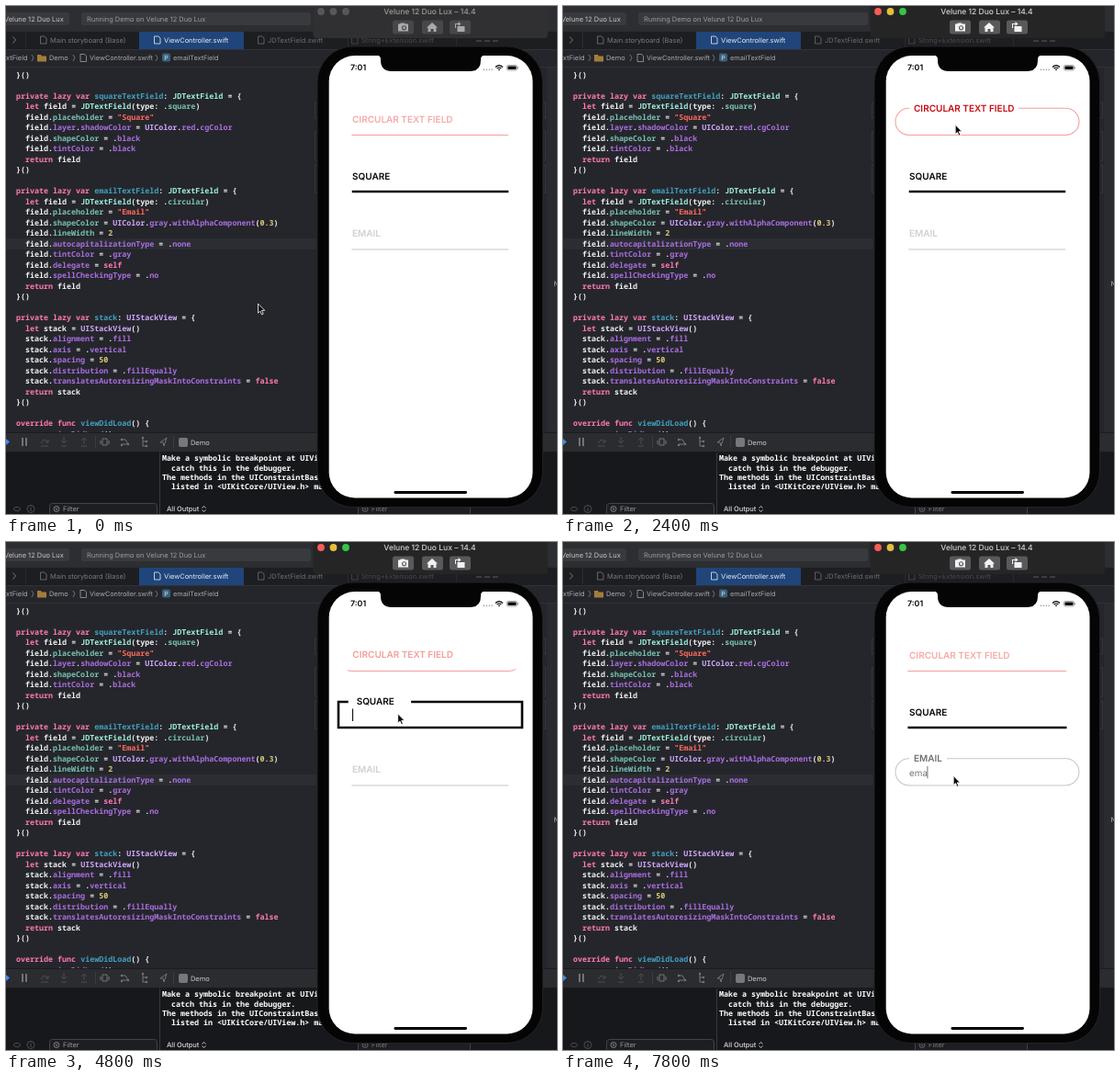
Recreate the animation shown at these times as an HTML page. Size 600x553 px, loop 8 s.

```html
<!DOCTYPE html>
<html lang="en">
<head>
<meta charset="utf-8">
<title>Text field demo</title>
<style>
html, body { margin: 0; width: 100%; height: 100%; overflow: hidden; background: #000; }
svg { display: block; width: 100vw; height: 100vh; }
text { white-space: pre; text-rendering: geometricPrecision; }
.ui { font-family: Inter, "Open Sans", sans-serif; font-size: 7.45px; }
.code { font: 600 8.36px "Noto Sans Mono", "DejaVu Sans Mono", monospace; fill: #f0f0f1; }
.label { font: 600 10px Inter, "Open Sans", sans-serif; }
.input { font: 400 9.9px Inter, "Open Sans", sans-serif; }
</style>
</head>
<body>
<svg id="stage" viewBox="0 0 600 553" preserveAspectRatio="none"></svg>
<script>
const stage = document.getElementById('stage');
const LOOP = 8000, STEP = 200;
const DEVICE = 'Velune 12 Duo Lux';

function add(tag, attrs = {}, parent = stage, content) {
  const el = document.createElementNS('http://www.w3.org/2000/svg', tag);
  for (const k in attrs) el.setAttribute(k, attrs[k]);
  if (content !== undefined) el.textContent = content;
  parent.append(el);
  return el;
}
const rect = (x, y, width, height, fill, more, parent) =>
  add('rect', { x, y, width, height, fill, ...more }, parent);
const line = (d, stroke, width = 1, parent) =>
  add('path', { d, stroke, fill: 'none', 'stroke-width': width }, parent);
const ui = (x, y, str, fill, more, parent) =>
  add('text', { x, y, fill, class: 'ui', ...more }, parent, str);
const docIcon = (x, y, stroke) => line(`M${x} ${y}h4.500l2 2v6h-6.500z`, stroke, .8);

// Syntax colouring
const KEYWORDS = /^(private|lazy|var|let|return|self|false|override|func)$/;
const OWN = /^(square|circular|placeholder|shapeColor|lineWidth)$/;
const TOKEN = /"[^"]*"|\d[\d.]*|(?<=\.)[a-z]\w*|(?<=(?:var|func) )\w+|\w+|\W/g;

function tint(token, before) {
  if (token[0] === '"') return '#fc6a5d';
  if (/^\d/.test(token)) return '#d9c97c';
  if (KEYWORDS.test(token)) return '#ff7ab2';
  if (/(var|func) $/.test(before)) return '#41a1c0';
  if (before.endsWith('.')) return OWN.test(token) ? '#78c2b3' : '#a96ee0';
  if (/^JD/.test(token)) return '#9ef1dd';
  if (/^UI/.test(token)) return '#d0a8ff';
}

function codeLine(src, x, y) {
  const text = add('text', { x, y, class: 'code' });
  let before = '';
  for (const token of src.match(TOKEN) || []) {
    const fill = tint(token, before);
    add('tspan', fill ? { fill } : {}, text, token);
    before += token;
  }
}

const SOURCE = `}()

private lazy var squareTextField: JDTextField = {
  let field = JDTextField(type: .square)
  field.placeholder = "Square"
  field.layer.shadowColor = UIColor.red.cgColor
  field.shapeColor = .black
  field.tintColor = .black
  return field
}()

private lazy var emailTextField: JDTextField = {
  let field = JDTextField(type: .circular)
  field.placeholder = "Email"
  field.shapeColor = UIColor.gray.withAlphaComponent(0.3)
  field.lineWidth = 2
  field.autocapitalizationType = .none
  field.tintColor = .gray
  field.delegate = self
  field.spellCheckingType = .no
  return field
}()

private lazy var stack: UIStackView = {
  let stack = UIStackView()
  stack.alignment = .fill
  stack.axis = .vertical
  stack.spacing = 50
  stack.distribution = .fillEqually
  stack.translatesAutoresizingMaskIntoConstraints = false
  return stack
}()

override func viewDidLoad() {
  super.viewDidLoad()`;

function drawEditor() {
  rect(0, 0, 600, 553, '#25262b');
  rect(0, 253, 338, 12, '#2b2d33');
  SOURCE.split('\n').forEach((src, i) => codeLine(src, 11, 77.6 + i * 11.5));
  for (const [y, h] of [[105, 17], [137, 31], [173, 30]])
    rect(336.5, y, 251, h, 'none', { stroke: '#36373c' });
  rect(589, 66, 11, 398, '#2a2b2f');
  ui(596.5, 305, 'N', '#b5b5b7', { 'font-size': 9 });

  // Toolbar
  rect(0, 0, 600, 27, '#2d2e31');
  rect(-5, 7, 74, 14, '#393a3d', { rx: 3 });
  rect(82, 7, 250, 14, '#393a3d', { rx: 3 });
  ui(-2, 16.8, DEVICE, '#c6c6c8');
  ui(88, 16.8, 'Running Demo on ' + DEVICE, '#9b9b9e');

  // Tabs
  rect(0, 27, 600, 20, '#1d1e21');
  rect(145, 27, 114, 20, '#1f457a');
  line('M21.5 28v18M372.5 28v18M490.5 28v18M0 27.5h600', '#2a2b2e');
  line('M7.5 33.5l3 3.5-3 3.5', '#77787b');
  for (const [x, name, fill] of [
    [48, 'Main.storyboard (Base)', '#77787c'],
    [172, 'ViewController.swift', '#e8edf5'],
    [285, 'JDTextField.swift', '#6c6d71'],
    [387, 'String+Extension.swift', '#4b4c50']
  ]) {
    docIcon(x - 10.5, 33, fill);
    ui(x, 39.8, name, fill);
  }
  line('M512 38h6m3 0h6m3 0h6', '#3c3d40', 2);

  // Breadcrumbs
  rect(0, 47, 600, 19, '#25262b');
  line('M0 47.5h600M0 66.500h600', '#303136');
  line('M28 53l2 3.5-2 3.5M73 53l2 3.5-2 3.5M163 53l2 3.5-2 3.5', '#7c7d80', .9);
  ui(0, 59.2, 'xtField', '#a9aaad');
  add('path', { d: 'M34 53h4l1 1.500h5v6h-10z', fill: '#a37c3c' });
  ui(47, 59.2, 'Demo', '#a9aaad');
  docIcon(81, 52.5, '#a0a1a4');
  ui(91, 59.2, 'ViewController.swift', '#a9aaad', { style: 'font-size:7.3px' });
  rect(170, 51.5, 9, 9, '#39627d', { rx: 2 });
  ui(172.3, 58.6, 'P', '#d6e8f2', { style: 'font-size:7px' });
  ui(182, 59.2, 'emailTextField', '#a9aaad', { style: 'font-size:7.3px' });
}

function drawConsole() {
  rect(0, 464, 600, 22, '#2b2c30');
  line('M0 464.5h600M0 485.500h600', '#1b1c1f');
  add('path', { d: 'M0 471l4 3.500-4 3.500z', fill: '#3f8cf3' });
  line('M18 470v9M22 470v9', '#88898c', 1.5);
  line('M38 476q4-7 8-1m0-3v3h-3M38 479h8M63 469v7m-3-3l3 3 3-3M60 479h6M85 477v-7m-3 3l3-3 3 3M82 479h6', '#4b4c50');
  line('M97.500 468v13M182.500 468v13', '#3b3c40');
  line('M105 471h5v7h-5zM103 473v4M112 473v4M126 472h4l3 5M126 477h7M149 470v9h4M149 474h4M168 475l7-5-3 9-1-4z', '#737478');
  for (const [x, y] of [[126, 472], [133, 477], [126, 478], [149, 470], [153, 474], [153, 479]])
    add('circle', { cx: x, cy: y, r: 1.2, fill: '#737478' });
  rect(188, 470, 10, 10, '#77787b', { rx: 2 });
  ui(201, 477.5, 'Demo', '#cbcbcd');

  rect(0, 486, 600, 67, '#17181b');
  line('M167.500 486v67', '#38393c');
  ['Make a symbolic breakpoint at UIViewAlert',
   '  catch this in the debugger.',
   'The methods in the UIConstraintBased',
   '  listed in <UIKitCore/UIView.h> may'].forEach((str, i) =>
    add('text', { x: 170, y: 495.3 + i * 10.2, class: 'code',
      style: 'fill:#fff;font-weight:700' }, stage, str));

  line('M8 547.500q4-4.500 8 0q-4 4.500-8 0M27 546v4M27 543.500v1', '#4b4c50');
  add('circle', { cx: 27, cy: 547.5, r: 4, fill: 'none', stroke: '#4b4c50' });
  for (const [x, w, fill] of [[47, 117, '#98999c'], [383, 122, '#77787b']]) {
    rect(x + .5, 541.5, w, 14, '#1d1e21', { rx: 3, stroke: '#424346' });
    add('circle', { cx: x + 8, cy: 547.5, r: 3, fill: 'none', stroke: fill, 'stroke-width': .8 });
    line(`M${x + 6.5} 547h3M${x + 7.3} 548.500h1.500`, fill, .7);
    ui(x + 15, 550.3, 'Filter', fill);
  }
  ui(175, 550.3, 'All Output', '#dededf', { 'font-weight': 500 });
  line('M213.500 546.500l2-2 2 2M213.500 548.500l2 2 2-2', '#dededf', .9);
}

function drawPhone() {
  rect(339, 44, 245.5, 501.5, '#050505', { rx: 39, stroke: '#222224', 'stroke-width': 1 });
  rect(351.7, 54, 221.8, 481.5, '#fff', { rx: 28 });
  add('path', { d: 'M404 53.500q4 .5 4 4.500v1q0 12 12 12h85q12 0 12-12v-1q0-4 4-4.500z', fill: '#050505' });
  ui(375, 70.2, '7:01', '#000', { style: 'font-size:8.8px', 'font-weight': 600 });
  for (let i = 0; i < 4; i++)
    add('circle', { cx: 520.5 + i * 2.9, cy: 69.3, r: .75, fill: '#8c8c8c' });
  line('M533 66.500q4-3.700 8 0M534.600 68q2.400-2 4.800 0', '#000', 1.2);
  add('path', { d: 'M535.700 68.900q1.300-.9 2.600 0l-1.300 1.400z', fill: '#000' });
  rect(545.5, 64.5, 11, 5.5, 'none', { rx: 1.6, stroke: '#777', 'stroke-width': .7 });
  rect(546.5, 65.5, 9, 3.5, '#000', { rx: .8 });
  rect(557.3, 66.2, .8, 2, '#777');
  rect(422.5, 528.1, 79.5, 2.8, '#000', { rx: 1.4 });
}

function drawWindowBar() {
  const bar = rect(334.5, -4, 255.5, 39, '', { rx: 4 });
  const dots = [343, 356.5, 370].map(cx => add('circle', { cx, cy: 6, r: 3.9 }));
  const title = ui(461.5, 9.2, DEVICE + ' – 14.4', '',
    { 'text-anchor': 'middle', style: 'font-size:8.5px', 'font-weight': 500 });
  const keys = [421, 453, 483].map(x => rect(x, 15.5, 23, 15, '', { rx: 2.5 }));
  const icons = add('g');
  for (const d of ['M427 19.500h2l1-1h4l1 1h3v8h-11z',
    'M458 23.500l6-5.500 6 5.500h-1.500v4.500h-3v-3h-3v3h-3v-4.500z',
    'M491.500 22h8v6h-8zM489 24v-5h3.500v-2l3 2.500-3 2.500v-2h-2.500v4z'])
    add('path', { d }, icons);
  const lens = add('circle', { cx: 433.5, cy: 23.8, r: 2, fill: 'none', 'stroke-width': 1.1 });
  return active => {
    const key = active ? '#59595b' : '#47474a';
    bar.setAttribute('fill', active ? '#252526' : '#303032');
    title.setAttribute('fill', active ? '#d2d2d3' : '#9a9a9b');
    icons.setAttribute('fill', active ? '#f2f2f2' : '#a9a9aa');
    lens.setAttribute('stroke', key);
    keys.forEach(k => k.setAttribute('fill', key));
    const colors = active ? ['#fc5b57', '#e5bf3c', '#35c648'] : Array(3).fill('#57575a');
    dots.forEach((dot, i) => dot.setAttribute('fill', colors[i]));
  };
}

const clamp = v => Math.max(0, Math.min(1, v));
const smooth = v => { v = clamp(v); return v * v * (3 - 2 * v); };
const mix = (a, b, k) => a + (b - a) * k;
const mixColor = (a, b, k) => `rgb(${a.map((v, i) => Math.round(mix(v, b[i], k)))})`;

const FADE = 300, LEFT = 362, RIGHT = 562, GAP = 377;
const REST_LEFT = 376.75, REST_RIGHT = 547.25;

// The outline runs clockwise from the gap's right end to its left end;
// at rest only the underline part of it is stroked.
function makeField(o) {
  const { y, h, r, gap } = o, bottom = y + h;
  const arc = (x, yy) => `A${r} ${r} 0 0 1 ${x} ${yy}`;
  const outline = line(`M${gap} ${y}H${RIGHT - r}${arc(RIGHT, y + r)}V${bottom - r}` +
    `${arc(RIGHT - r, bottom)}H${LEFT + r}${arc(LEFT, bottom - r)}V${y + r}` +
    `${arc(LEFT + r, y)}H${GAP}`, o.stroke, o.width);
  const total = outline.getTotalLength();
  const restStart = RIGHT - r - gap + Math.PI * r + h - 2 * r + RIGHT - r - REST_RIGHT;
  const restEnd = restStart + REST_RIGHT - REST_LEFT;
  const label = add('text', { class: 'label' }, stage, o.label);
  const input = add('text', { class: 'input', x: 377, y: o.text + 7.2, fill: '#757575' });
  const caret = rect(377, o.text - 3.5, 1.1, 13.5, o.caret);

  return t => {
    const k = smooth((t - o.open) / FADE) * (1 - smooth((t - o.close) / FADE));
    const over = t > o.close ? 1.3 : 0;
    const from = mix(restStart - over, 0, k), to = mix(restEnd + over, total, k);
    outline.setAttribute('stroke-dasharray', `0 ${from} ${to - from} ${total}`);
    label.setAttribute('x', mix(377, 382, k));
    label.setAttribute('y', mix(o.text + 3.6, o.text - 8.4, k));
    label.setAttribute('fill', mixColor(o.idle, o.lit, k));

    const typed = o.typed ? o.typed.filter(at => t >= at).length : 0;
    input.textContent = 'ema'.slice(0, typed);
    caret.setAttribute('x', 377 + (typed ? input.getComputedTextLength() - .6 : 0));
    const blink = typed || (t - o.open) % 1000 < 500;
    caret.style.display = t > o.open && t < o.close && blink ? '' : 'none';
  };
}

drawEditor();
drawConsole();
drawPhone();
const setWindow = drawWindowBar();
const fields = [
  { label: 'CIRCULAR TEXT FIELD', text: 123, y: 111.3, h: 29.2, r: 14.6, gap: 496,
    stroke: '#f2a09e', width: 1.05, idle: [245, 169, 167], lit: [201, 10, 18],
    caret: '#d33', open: 1850, close: 4550 },
  { label: 'SQUARE', text: 185, y: 174, h: 28, r: 0, gap: 428,
    stroke: '#080808', width: 2.6, idle: [8, 8, 8], lit: [8, 8, 8],
    caret: '#111', open: 4550, close: 5750 },
  { label: 'EMAIL', text: 247.4, y: 235.8, h: 29.2, r: 14.6, gap: 418,
    stroke: '#c6c6c8', width: 1.05, idle: [208, 208, 210], lit: [112, 112, 114],
    caret: '#808080', open: 5750, close: Infinity, typed: [7200, 7400, 7600] }
].map(makeField);
const cursor = add('path', { d: 'M0 0V10.200l2.300-2.100 1.700 3.800 1.700-.8-1.700-3.700h3.200z',
  fill: '#080808', stroke: '#fff', 'stroke-width': .8 });

// Time, x and y of the pointer's stops
const STOPS = [[0, 274.5, 324], [300, 274.5, 324], [1150, 424.4, 126.5], [1400, 424.4, 126.5],
  [1700, 427.2, 129.3], [3600, 427.2, 129.3], [4250, 426.8, 183], [4700, 426.8, 183],
  [5400, 425.2, 254.5], [LOOP, 425.2, 254.5]];

function pointerAt(t) {
  const i = STOPS.findIndex(s => s[0] > t);
  const [t0, x0, y0] = STOPS[i - 1], [t1, x1, y1] = STOPS[i];
  const k = smooth((t - t0) / (t1 - t0));
  return [mix(x0, x1, k), mix(y0, y1, k)];
}

function render(t) {
  setWindow(t >= 1500);
  fields.forEach(update => update(t));
  cursor.setAttribute('transform', `translate(${pointerAt(t)})`);
}

const began = performance.now();
function tick() {
  const t = (performance.now() - began) % LOOP;
  render(Math.floor(t / STEP) * STEP);
  requestAnimationFrame(tick);
}
tick();
</script>
</body>
</html>
```
